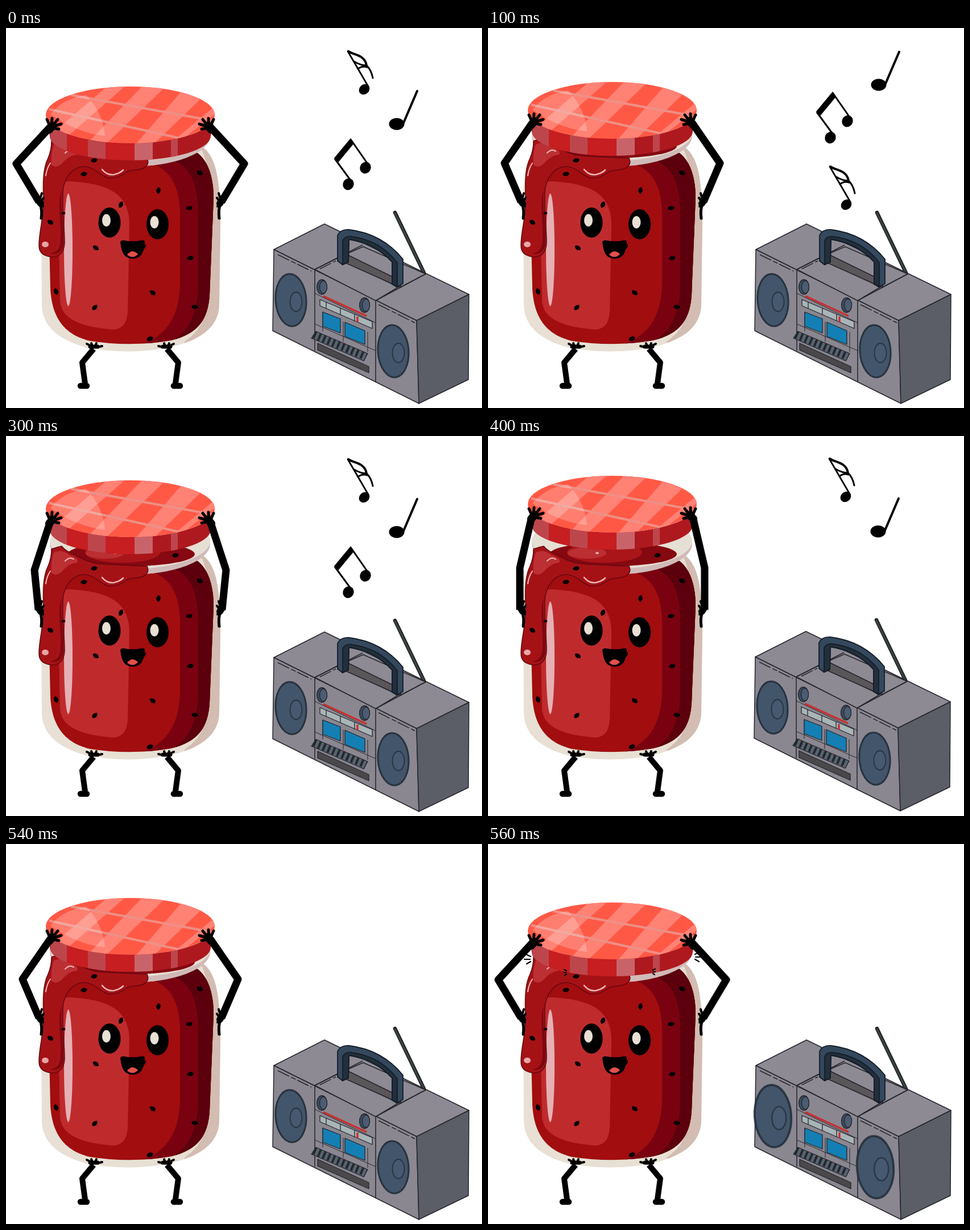
Write an HTML page without scripts that moves like this. It is 837x669 px and loops after 0.66 s.

```html
<!DOCTYPE html>
<html lang="en">
<head>
<meta charset="utf-8">
<title>Dancing jam jar</title>
<style>
html, body { margin: 0; width: 100%; height: 100%; overflow: hidden; background: #fff; }
svg { display: block; width: 100%; height: 100%; }
.lid, .arm, .noteA, .noteB, .noteC, .speaker, .marks, .right { animation: lid 660ms step-end infinite; }
.arm { animation-name: arm; fill: none; stroke: #000; stroke-width: 13; stroke-linejoin: round; }
.noteA { animation-name: noteA; }
.noteB { animation-name: noteB; }
.noteC { animation-name: noteC; }
.speaker { animation-name: thump; }
.marks { animation-name: marks; }
.right { animation-name: jolt; }

@keyframes lid {
  0%, 84.84% { transform: none; }
  15.15%, 81.81% { transform: translateY(-8px); }
  30.3%, 78.78% { transform: translateY(-17px); }
  45.45%, 75.75% { transform: translateY(-25px); }
  60.6% { transform: translateY(-33px); }
}
@keyframes arm {
  0%, 84.84% { d: path("M78 174L18 239L58 306"); }
  15.15%, 81.81% { d: path("M78 167L29 238L58 306"); }
  30.3%, 78.78% { d: path("M78 158L40 237L58 306"); }
  45.45%, 75.75% { d: path("M78 150L50 236L57 306"); }
  60.6% { d: path("M77 142L56 232L56 306"); }
}
@keyframes noteA {
  0%, 45.45% { transform: none; }
  15.15% { transform: translateY(203px); }
  30.3% { transform: translateY(100px); }
  75.75%, 100% { visibility: hidden; }
}
@keyframes noteB {
  0%, 45.45% { transform: none; }
  15.15%, 75.75% { transform: translateY(-69px); }
  30.3% { transform: translateY(85px); }
  78.78%, 100% { visibility: hidden; }
}
@keyframes noteC {
  0%, 45.45% { transform: none; }
  15.15% { transform: translateY(-82px); }
  30.3% { transform: translateY(-155px); }
  60.6%, 100% { visibility: hidden; }
}
@keyframes thump { 0% { transform: none; } 84.84%, 100% { transform: scale(1.19); } }
@keyframes marks { 0% { visibility: hidden; } 84.84%, 100% { visibility: visible; } }
@keyframes jolt { 0%, 75.75% { transform: none; } 60.6% { transform: translate(-1px, -1px); } }
</style>
</head>
<body>
<svg viewBox="0 0 837 669">
  <defs>
    <clipPath id="top"><ellipse cx="218.5" cy="153" rx="148.5" ry="50"/></clipPath>
    <path id="rimShape" d="M70 153A148.5 50 0 0 0 367 153L360 190A141.5 43 0 0 1 77 190Z"/>
    <clipPath id="rim"><use href="#rimShape"/></clipPath>
    <path id="glass" d="M90 212C66 230 62 262 62 300L63 488C64 525 92 549 140 562Q215 577 290 562C345 548 373 526 375 488L377 340C376 260 368 226 346 210Z"/>
    <clipPath id="glassClip"><use href="#glass"/></clipPath>
    <path id="jam" d="M88 225C74 244 74 265 74 290L78 460C81 510 102 540 148 551Q220 562 290 550C336 539 355 515 358 470L365 300C365 260 354 232 335 219Z"/>
    <clipPath id="jamClip"><use href="#jam"/></clipPath>
    <path id="seed" d="M-6 1C-4-5 3-5 6-1C4 5-3 5-6 1Z"/>
    <g id="hand" fill="none" stroke="#000" stroke-linecap="round" stroke-linejoin="round">
      <path d="M76 179L82 172" stroke-width="14"/>
      <path d="M77 172L72 161M80 171L81 159M83 171L91 161M84 173L97 169M83 176L93 178" stroke-width="5"/>
    </g>
    <g id="limbs" fill="none" stroke="#000" stroke-linecap="round" stroke-linejoin="round">
      <path d="M57 303L61 309" stroke-width="12"/>
      <path d="M58 300L52 293M60 300L63 291M61 306L66 299M61 309L65 314" stroke-width="4"/>
      <path d="M60 310Q64 320 62 335" stroke-width="5"/>
      <path d="M154 565L134 589L139 626" stroke-width="10" stroke-linecap="butt"/>
      <path d="M131 630H142" stroke-width="10.5"/>
      <path d="M148 561H161" stroke-width="7"/>
      <path d="M150 560L142 556M152 560L150 555M157 560L159 555M160 562L169 560" stroke-width="4"/>
    </g>
    <g id="spark" fill="none" stroke="#000" stroke-width="2.2" stroke-linecap="round">
      <path d="M66 194L75 198M64 203L74 203M68 211L75 207"/>
    </g>
    <path id="tick" d="M134 221L138 223M134 226H137M135 231L138 229" stroke="#000" stroke-width="2.2" stroke-linecap="round"/>
    <g id="speakerShape">
      <ellipse rx="27" ry="46" fill="#43556a" stroke="#27333f" stroke-width="3" transform="rotate(-4)"/>
      <ellipse cx="9" cy="3" rx="10.5" ry="17" fill="#465970" stroke="#27333f" stroke-width="1.8"/>
    </g>
  </defs>
  <rect width="837" height="669" fill="#fff"/>

  <!-- jar -->
  <use href="#glass" fill="#e8e0d4"/>
  <path d="M335 200C362 235 362 290 355 480C350 525 330 540 314 552L310 575H390V200Z" fill="#d3bcb1" clip-path="url(#glassClip)"/>
  <use href="#jam" fill="#a20d0f"/>
  <g clip-path="url(#jamClip)">
    <path d="M235 235C290 240 306 280 306 330V450C305 510 280 548 225 560H380V200H235Z" fill="#7a0210"/>
    <path d="M275 228C325 235 338 275 338 330V450C337 510 318 538 282 557H380V200H275Z" fill="#5b000c"/>
  </g>
  <path d="M91 288Q91 269 112 270C190 274 216 298 217 345L214 500Q212 530 188 531C130 526 97 512 95 480Z" fill="#bf2b2d"/>
  <ellipse cx="109.5" cy="390.500" rx="7.500" ry="99" fill="#e5b1b5"/>

  <!-- neck -->
  <ellipse cx="218" cy="190" rx="141" ry="54" fill="#d0bab8"/>
  <ellipse cx="218" cy="185" rx="141" ry="49" fill="#e6dfd4"/>
  <ellipse cx="220" cy="208" rx="112" ry="21" fill="#860811"/>
  <ellipse cx="205" cy="205" rx="66" ry="18" fill="#a91519"/>
  <ellipse cx="174" cy="206" rx="34" ry="10" fill="#bb2e31"/>
  <ellipse cx="192" cy="206" rx="3" ry="2" fill="#e9a3a5"/>
  <use href="#seed" transform="translate(298 210)"/>

  <!-- drip -->
  <path d="M80 199Q92 195 98 194Q104 201 112 205C130 213 140 222 165 225Q215 228 248 229Q252 237 247 243C238 252 222 248 211 254Q196 266 180 264C165 260 157 246 140 244C120 243 106 258 101 280C97 310 103 345 103 378Q102 402 82 403Q58 402 58 383C58 355 67 335 66 300C65 265 66 245 74 229Q80 215 80 199Z" fill="#a51216" stroke="#64070e" stroke-width="1.5"/>
  <path d="M84 205Q98 198 112 210Q130 216 125 223Q110 224 99 238Q88 248 80 241Q78 224 84 205Z" fill="#bc3033"/>
  <path d="M95 295C92 330 99 355 95 382Q91 395 78 397Q98 401 101 380C103 345 95 320 98 285Z" fill="#7d0710"/>
  <g fill="none" stroke="#eeb9b9" stroke-linecap="round">
    <path d="M169 249Q178 260 190 258Q200 256 206 250" stroke-width="2.5"/>
    <path d="M70 260Q72 246 78 238M104 220Q112 212 119 217" stroke-width="2"/>
  </g>
  <ellipse cx="69" cy="381" rx="6" ry="5" fill="#e8a6a8"/>

  <!-- seeds -->
  <use href="#seed" x="155" y="233"/>
  <use href="#seed" x="137" y="257"/>
  <use href="#seed" transform="translate(268 286) rotate(-75)"/>
  <use href="#seed" x="322" y="317"/>
  <use href="#seed" transform="translate(341 255) rotate(35)"/>
  <use href="#seed" transform="translate(202 311) rotate(-55)"/>
  <use href="#seed" transform="translate(158 387) rotate(45)"/>
  <use href="#seed" x="324" y="405"/>
  <use href="#seed" transform="translate(258 466) rotate(45)"/>
  <use href="#seed" transform="translate(156 492) rotate(-35)"/>
  <use href="#seed" transform="translate(88 464) rotate(80)"/>
  <use href="#seed" transform="translate(332 491) rotate(20)"/>
  <use href="#seed" transform="translate(253 547) rotate(-15)"/>
  <use href="#seed" transform="translate(78 342) rotate(40)"/>
  <use href="#seed" transform="translate(101 326) scale(.6)"/>
  <use href="#seed" transform="translate(241 385) rotate(-30)"/>

  <!-- face -->
  <ellipse cx="182" cy="342.500" rx="19.500" ry="26.500"/>
  <ellipse cx="266.500" cy="345.500" rx="19.500" ry="26.500"/>
  <g fill="#e8e0d4">
    <ellipse cx="176.500" cy="338.500" rx="7.500" ry="11"/>
    <ellipse cx="261" cy="342" rx="7.500" ry="11"/>
  </g>
  <path d="M201 376Q204 373 208 374Q223 377 238 374Q244 373 244 377C243 394 238 406 223 406C207 406 203 394 201 376Z"/>
  <path d="M213 399Q222 388 232 398Q228 403 222 403Q217 403 213 399Z" fill="#e5504b"/>

  <!-- lid -->
  <g class="lid">
    <use href="#rimShape" fill="#ae191f"/>
    <g clip-path="url(#rim)">
      <path d="M107 150H144V240H107ZM175 150H226V240H175Z" fill="#c61e21"/>
      <path d="M78 150H107V240H78ZM144 150H175V240H144ZM290 150H302V240H290Z" fill="#bd464c"/>
      <path d="M226 150H258V240H226Z" fill="#c9636a"/>
    </g>
    <g clip-path="url(#top)">
      <rect x="65" y="100" width="310" height="110" fill="#ff5946"/>
      <path d="M74 192L181 100H212L106 193ZM143 203L242 100H284L174 206ZM226 207L310 110L341 126L257 207ZM290 202L362 142L372 148L302 202Z" fill="#ff8275"/>
      <path d="M114 118L368 164M76 143L306 194" fill="none" stroke="#ee9086" stroke-width="4"/>
      <path d="M78 152Q100 124 141 118Q171 150 174 190Q125 185 78 152Z" fill="#fff" opacity=".22"/>
    </g>
  </g>

  <!-- limbs -->
  <use href="#limbs"/>
  <path class="arm" d="M78 174L18 239L58 306"/>
  <g class="lid"><use href="#hand"/></g>
  <g transform="matrix(-1 0 0 1 437 0)">
    <use href="#limbs"/>
    <path class="arm" d="M78 174L18 239L58 306"/>
    <g class="lid"><use href="#hand"/></g>
  </g>
  <g class="marks">
    <use href="#spark"/>
    <use href="#tick"/>
    <use href="#spark" transform="matrix(-1 0 0 1 439 -4)"/>
    <use href="#tick" transform="matrix(-1 0 0 1 428 -1)"/>
  </g>

  <g class="right">
    <!-- notes -->
    <g class="noteA">
      <ellipse cx="630" cy="108" rx="10" ry="8.500" transform="rotate(-40 630 108)"/>
      <g fill="none" stroke="#000" stroke-linecap="round">
        <path d="M601 41L637 103" stroke-width="2.800"/>
        <path d="M602 41C612 48 631 47 634 66" stroke-width="4"/>
        <path d="M612 59Q624 66 634 66Q642 73 645 88M619 72Q626 66 635 69" stroke-width="3"/>
      </g>
    </g>
    <g class="noteB">
      <ellipse cx="687" cy="169" rx="13.500" ry="10.500"/>
      <path d="M699 167L723 111" stroke="#000" stroke-width="4" stroke-linecap="round"/>
    </g>
    <g class="noteC">
      <ellipse cx="602" cy="275" rx="9.500" ry="10.500" transform="rotate(25 602 275)"/>
      <ellipse cx="632" cy="246" rx="9.500" ry="10.500" transform="rotate(25 632 246)"/>
      <path d="M577 229L606 194L612 203L583 238Z"/>
      <path d="M578 230L608 271M606 196L638 242" stroke="#000" stroke-width="3"/>
    </g>

    <!-- radio -->
    <g stroke="#25252b" stroke-width="1.500" stroke-linejoin="round">
      <path d="M684 325L735 431" stroke="#1c2022" stroke-width="6.500" stroke-linecap="round"/>
      <path d="M684 326L735 431" stroke="#3c4242" stroke-width="3.500" stroke-linecap="round"/>
      <path d="M471 390L560 345L814 469L722 515Z" fill="#8d8a94"/>
      <path d="M471 390L722 515L726 661L469 533Z" fill="#8a8791"/>
      <path d="M722 515L814 469L813 619L726 661Z" fill="#5b5e66"/>
      <path d="M543 425L583 405L690 456L650 480Z" fill="#8d8a94"/>
      <path d="M598 398L628 385L738 433L694 456Z" fill="#8d8a94"/>
      <path d="M598 398L694 445V457L598 414Z" fill="#5a565a"/>
      <path d="M543 425V568M650 480V624M543 425L627 382M650 480L738 433" fill="none"/>
      <path d="M478 399L537 428M655 487L719 519M552 424L580 410" fill="none" stroke-dasharray="22 4 9 3"/>
      <path d="M543 467L650 519M543 521L650 568M593 517V552M557 500V534M636 535V570" fill="none" stroke-width="1"/>
    </g>
    <g stroke="#151d27" stroke-width="1.800" stroke-linejoin="round">
      <path d="M583 410V365Q588 354 603 355C645 360 676 380 698 407V450L687 456L679 451V412C660 391 635 377 603 372L602 412L592 417Z" fill="#34485d"/>
      <path d="M592 416V374Q596 366 606 367C640 371 668 387 688 413V455L679 451V412C660 391 635 377 603 372L602 412Z" fill="#222f3d"/>
    </g>

    <!-- controls -->
    <g stroke="#25252b" stroke-width="1.300" stroke-linejoin="round">
      <ellipse cx="555.500" cy="456" rx="9" ry="13" fill="#3c4d60"/>
      <ellipse cx="558" cy="456" rx="6.500" ry="11" fill="#4a5d72"/>
      <ellipse cx="630.500" cy="488" rx="9" ry="13" fill="#3c4d60"/>
      <ellipse cx="633" cy="488" rx="6.500" ry="11" fill="#4a5d72"/>
      <path d="M552 478L644 517V529L552 489Z" fill="#a8b5b6"/>
      <path d="M563 483V494M588 493V505M613 504V516" fill="none"/>
      <path d="M557 500L588 512V537L557 525ZM596 518L631 533V557L596 543Z" fill="#147fb4"/>
      <path d="M545 534L636 573L629 586L537 546Z" fill="#59636f"/>
      <path d="M541 540L633 579" stroke="#23282f" stroke-width="13" stroke-dasharray="4 5"/>
      <path d="M548 555L638 596V607L548 567Z" fill="#4a484b"/>
    </g>
    <path d="M558 472L634 507M618 508V518" fill="none" stroke="#c92f2d" stroke-width="3.500"/>

    <g transform="translate(501 479)"><g class="speaker"><use href="#speakerShape"/></g></g>
    <g transform="translate(681 569)"><g class="speaker"><use href="#speakerShape"/></g></g>
  </g>
</svg>
</body>
</html>
```
